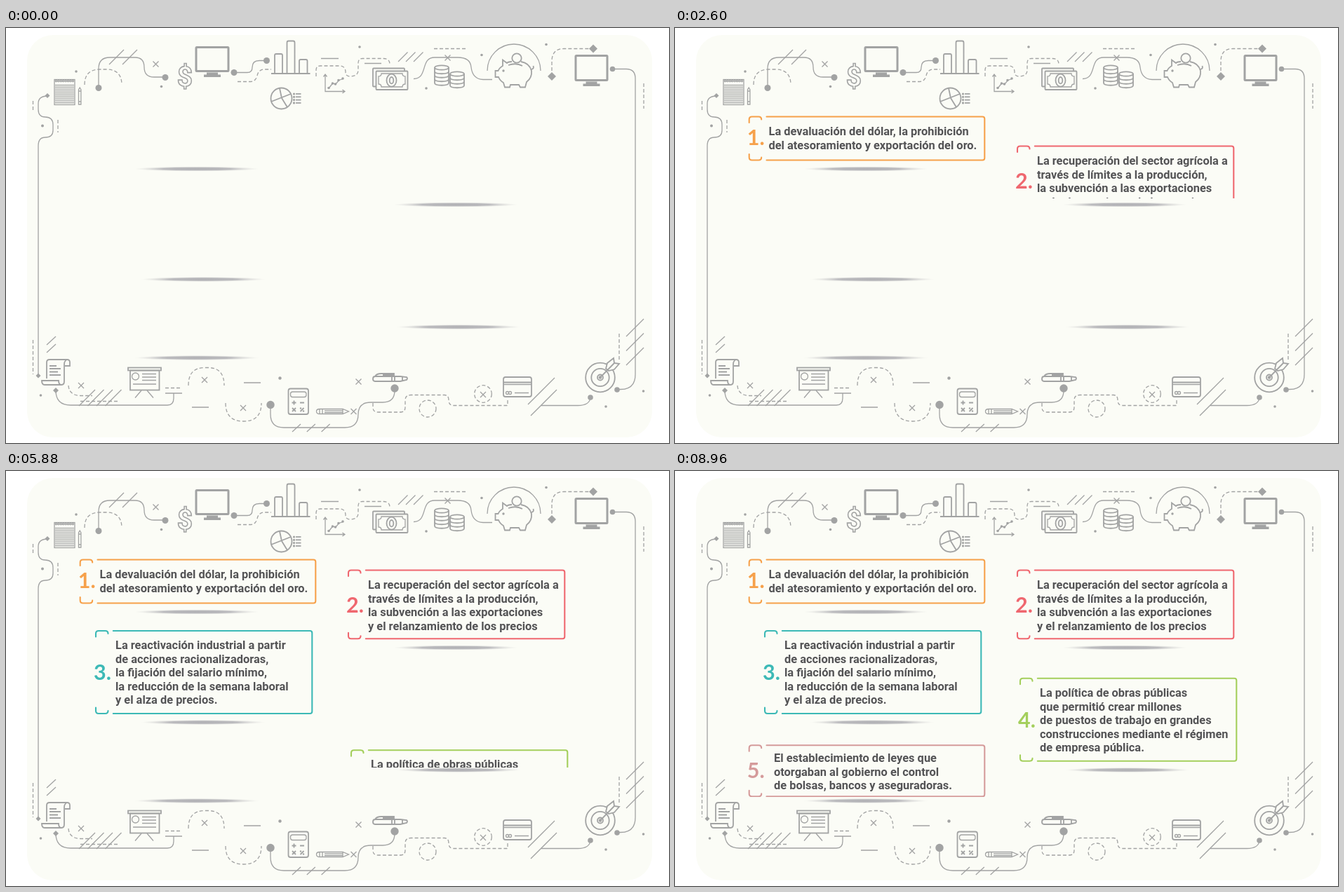
Recreate the animation shown at these times as an HTML page. Size 945 px wide and 592 px high, loop 9000 ms.

```html
<!DOCTYPE html>
<html lang="es">
<head>
<meta charset="utf-8">
<style>
html, body { margin: 0; width: 100%; height: 100%; overflow: hidden; background: #fff; }
svg { display: block; width: 945px; height: 592px; }
.art { fill: none; stroke: #a2a3a3; stroke-width: 1.3; }
.art .solid { fill: #a2a3a3; stroke: none; }
.art .dash { stroke-dasharray: 5 3; }
.art .bold { stroke-width: 1.8; }
.art .paper { fill: #fbfcf6; }
.copy { font: 600 16.4px Roboto, "Open Sans", sans-serif; fill: #535355; }
.num { font: 700 30.5px Lato, Roboto, sans-serif; }
.frame { fill: none; stroke-width: 2.1; stroke-linecap: round; }
</style>
</head>
<body>
<svg viewBox="0 0 945 592">
  <defs>
    <radialGradient id="shade">
      <stop offset="0" stop-color="#b0b0b4"/>
      <stop offset=".55" stop-color="#bbbbbe"/>
      <stop offset="1" stop-color="#dcdcda" stop-opacity="0"/>
    </radialGradient>
  </defs>
  <rect x="30" y="10" width="891" height="574" rx="37" fill="#fbfcf6"/>
  <g id="art" class="art"></g>
  <g id="shadows" fill="url(#shade)"></g>
  <g id="cards"></g>
</svg>
<script>
const STEP = 40, LOOP = 9000;
const $ = id => document.getElementById(id);

// Shape helpers
const path = (d, cls = '') => `<path class="${cls}" d="${d}"/>`;
const dash = d => path(d, 'dash');
const dot = (x, y, r = 1.8) => `<circle class="solid" cx="${x}" cy="${y}" r="${r}"/>`;
const ring = (x, y, r, cls = '') => `<circle class="${cls}" cx="${x}" cy="${y}" r="${r}"/>`;
const oval = (x, y, rx, ry, cls = '') => `<ellipse class="${cls}" cx="${x}" cy="${y}" rx="${rx}" ry="${ry}"/>`;
const box = (x, y, w, h, r = 0, cls = '') =>
  `<rect class="${cls}" x="${x}" y="${y}" width="${w}" height="${h}" rx="${r}"/>`;
const cross = (x, y, s = 4) => path(`M${x - s} ${y - s}l${2 * s} ${2 * s}m0 ${-2 * s}l${-2 * s} ${2 * s}`);
const diamond = (x, y, s) => path(`M${x} ${y - s}l${s} ${s}l${-s} ${s}l${-s} ${-s}z`, 'solid');
const slash = (x, y, w, h = w) => path(`M${x} ${y}l${w} ${-h}`);
const repeat = (n, draw) => Array.from({ length: n }, (_, i) => draw(i)).join('');

const monitor = (x, y, w, h) => `<g stroke-width="3">${box(x, y, w, h, 1)}</g>` +
  path(`M${x + w / 2 - 8} ${y + h + 2}h16v3h4v3.5h-24v-3.5h4z`, 'solid');

const coins = (x, top, n) => oval(x, top, 10, 3.2, 'bold') +
  repeat(n, i => path(`M${x - 10} ${top + i * 5.5}v5.5c0 4.3 20 4.3 20 0v-5.5`, 'bold'));

const connectors = () =>
  path('M132 85V58Q132 42 148 42H184Q197 42 197 56Q197 70 211 70H227') + dot(132, 85.5, 4.5) + dot(227, 70.5, 4.5) +
  path('M325 63.5H344Q351 63.5 351 56Q351 46.5 361 46.5H371') + dot(325, 63.5, 4.5) + dot(371.5, 46.5, 4.5) +
  path('M581 72.5C602 72 590 42 611 42H644Q662 42 663 56Q665 73 680 73.5H693') +
  path('M865 58.5H884Q897 58.5 897 72V494Q897 515.5 876 515.5H871') + dot(864.5, 58.5, 3.8) + dot(871, 516, 3.8) +
  path('M59 97Q46 97 46 108V116Q46 127 56 127Q67 127 67 138V146Q67 156 56 156Q46 156 46 168V496') +
  diamond(59, 96.5, 3.5) + diamond(46, 496, 3.5) +
  path('M71 517Q71 538 92 538H230Q239 538 239 528V521') + diamond(71, 517, 4) +
  path('M377 537V551Q377 570 396 570H483Q502 570 502 551Q502 534 520 534H537Q554 534 554 517') +
  dot(377, 537.5, 5.7) + dot(554, 514, 5.7) +
  path('M763 538.5H815Q832 538.5 833 527') + dot(833, 527, 3.8);

const dashes = () => [
  'M112 81Q112 59 134 59H143Q165 59 165 81', 'M330 76.5H349Q356 76 358 68Q360 59 368 59H378',
  'M442 69V60Q442 54 448 54H475Q484 54 484 63Q484 69 490 69Q502 69 502 60V50Q502 43.5 508 43.5H538Q547 43.5 547 52',
  'M610 29.5H657', 'M778 69V46Q779 29.5 795 29.5H837', 'M909 79V115', 'M38.5 104V117', 'M74 131V149',
  'M38.5 445V494', 'M89 510Q90 524 106 524.5H123', 'M106 532.5H160', 'M227 513.5H251',
  'M260 510Q260 484.5 283 484.5H288Q311 484.5 311 510', 'M313 535Q313 561 338.5 561T364 535',
  'M523 535V541Q523 548 530 548H562Q569 548 569 541V531Q569 523.5 577 523.5H625Q631 523.5 631 531Q631 538.5 638 538.5H715V529',
  'M874 436V476'
].map(dash).join('') + ring(601, 543, 12, 'dash') + ring(680, 522, 12.3, 'dash');

const accents = () =>
  slash(147, 52, 21) + slash(166, 52, 21) + repeat(3, i => slash(559 + i * 11, 48, 13.5)) +
  slash(58, 452, 13, 12) + slash(58, 463, 13, 12) +
  repeat(4, i => slash(104 + i * 12.5, 539, 23)) + repeat(3, i => slash(408 + i * 20.8, 576, 12, 11)) +
  slash(744, 537, 38) + slash(748, 553, 37) + repeat(3, i => slash(884, 440 + i * 20.5, 25)) +
  cross(213.5, 51.5) + cross(629.5, 42.5) + cross(107, 510) + cross(283, 502) + cross(338, 542) +
  cross(495.5, 547) + cross(502.5, 504.5) + cross(680, 523) +
  path('M449 43.5h25M511 50.5h24M227 521h24M265 541h24M339 506h24') +
  dot(100, 62) + dot(221.5, 83.5) + dot(504, 27) + dot(599, 86) + dot(678, 38.5) + dot(770, 23.5) +
  dot(52, 139.5, 2) + dot(49.5, 524) + dot(390.5, 499.5, 2.2) + dot(855, 540) + dot(908.5, 518) +
  diamond(837, 29.5, 6) + diamond(778, 69, 6);

const topIcons = () =>
  box(69, 73.5, 29, 36) + repeat(10, i => path(`M70 ${81.5 + i * 2.8}h27`)) +
  repeat(8, i => ring(71.5 + i * 3.4, 75.5, 1.2)) +
  path('M103.5 108V88l1.7-3 1.7 3v21h-3.4zM103.5 105h3.4M103.5 90h3.4') +
  `<text x="255" y="83" text-anchor="middle" font-family="Roboto, sans-serif" font-size="39" font-weight="700" stroke-width="1.6">$</text>` +
  monitor(271, 27.5, 46, 34) + monitor(812, 39.5, 45, 35) +
  path('M383 65V39q0-2 2-2h7q2 0 2 2V65M400.5 65V21q0-2.5 2-2.5h7q2 0 2 2.5V65M418 65V47q0-2 2-2h7.5q2 0 2 2V65M378 65h55.5', 'bold') +
  ring(392.5, 100.5, 15, 'bold') +
  path('M393 100L390 86M378 105L406 94M393 100L401 113', 'bold') +
  repeat(4, i => dot(410.5, 94 + i * 4.3, 1.6) + path(`M413 ${94 + i * 4.3}h7.5`, 'bold')) +
  path('M455 66v24.5h28M452.5 69.5l2.5-3.5 2.5 3.5M479.5 88l3.5 2.5-3.5 2.5M460 86l5.5-7 4.5 1 4.5-5.5 6-2') +
  dot(460, 85.5) + dot(465.5, 79) + dot(469.5, 80) + dot(474, 74.5) + dot(480, 72) +
  box(523, 57.5, 45, 26, 1, 'bold') + box(527.5, 61.5, 45, 26.5, 1, 'bold paper') +
  path('M535 65h30q0 4 4 4v11q-4 0-4 4h-30q0-4-4-4v-11q4 0 4-4z') +
  oval(549.5, 74.7, 7, 9, 'bold') + oval(549.5, 74.7, 2.8, 4.7, 'bold') +
  coins(621, 56.5, 4) + coins(643, 65.5, 3) +
  path('M686 61A38 38 0 0 1 762 61') + ring(728, 43, 6.7, 'bold') +
  path('M721 48Q716 48 714 50L708 45.5V54Q703 57 701.5 61H697.5V70H702Q704 75 709 78L711 84.5H718L719 81H731L733 84.5H740L742 77Q750 71 749 61Q746 50 734 48M749 59q4-1 2.5-5M716 53q11-4 20 1', 'bold') +
  dot(709, 61, 1.7);

const bottomIcons = () =>
  path('M58 500V477q0-4 4-4h25q4 0 4 4v5h-7M86 474q-3 1-3 6v24q0 5-4 5H55q-4 0-4-6h24q0 6 4 6M62 482h10M62 486h16M62 490.5h12M62 495h16', 'bold') +
  box(174, 484.5, 47, 4, 0, 'bold') + box(177, 488.5, 41.5, 28, 0, 'bold') + ring(184.5, 497, 5) +
  path('M194 493.5h20M194 498h20M194 502.5h20M181 508h33M193 517l-9 10.5M201 517l9 10.5') +
  box(402.5, 514.5, 28.5, 36.5, 3, 'bold') + box(405.5, 519, 22.5, 7.5, 3) +
  path('M407.5 534.5h6M410.5 531.5v6M419 534.5h6M408 542l5 5m0-5l-5 5M419.5 547l5-5', 'bold') +
  dot(420, 542.5, 1.2) + dot(424, 546.5, 1.2) +
  path('M447 543.5h33l8.5 3.5-8.5 3.5h-33q-4.5 0-4.5-3.5t4.5-3.5zM447 543.5v7M451 543.5v7M454 545.8h26M454 548.5h26M480 543.5v7') +
  path('M526 497h36l9 1q2 2 0 4l-9 2h-36q-3 0-3-3.5t3-3.5zM526 497q2-4 9-4h18v2h-16M550 497v7M554 497v7M565 497.5v6', 'bold') +
  box(709, 498, 40, 28, 3, 'bold') + path('M709 505.5h40', 'bold') + path('M709 508.5h40M725 520.5h20') +
  ring(714.5, 520.5, 2) + ring(718.5, 520.5, 2) +
  ring(847, 498.5, 20.8, 'bold') + ring(847, 498.5, 12.7, 'bold') + ring(847, 498.5, 4, 'bold') +
  path('M855 486l2-8 9-7 1 7 7 1-7 8-8 2z', 'paper bold') + path('M847 498.5L867 478', 'bold') + dot(847, 498.5, 2.3);

$('art').innerHTML = connectors() + dashes() + accents() + topIcons() + bottomIcons();

$('shadows').innerHTML = [[272, 201], [641, 252], [281, 358.5], [645, 426.5], [272, 470.5]]
  .map(([x, y]) => oval(x, y, 89, 3.5)).join('');

// Each card climbs at a steady pace from behind its floor line.
const cards = [
  { x: 105.7, right: 441.3, top: 126.5, bottom: 188.5, color: '#f6a14b', floor: 195, start: 320, end: 1000, rise: 68,
    tx: 133.5, ty: 153, ny: 166.5, lines: ['La devaluación del dólar, la prohibición', 'del atesoramiento y exportación del oro.'] },
  { x: 488, right: 796.3, top: 141.5, bottom: 239.3, color: '#ef676f', floor: 243, start: 1640, end: 2960, rise: 99,
    tx: 516, ty: 168, ny: 201.5, lines: ['La recuperación del sector agrícola a', 'través de límites a la producción,',
      'la subvención a las exportaciones', 'y el relanzamiento de los precios'] },
  { x: 128, right: 436.3, top: 228, bottom: 346, color: '#3cb9b6', floor: 353, start: 3560, end: 5000, rise: 124.5,
    tx: 156, ty: 254.3, ny: 298, lines: ['La reactivación industrial a partir', 'de acciones racionalizadoras,',
      'la fijación del salario mínimo,', 'la reducción de la semana laboral', 'y el alza de precios.'] },
  { x: 492, right: 800.3, top: 295.8, bottom: 413.7, color: '#a4cf5c', floor: 423, start: 5600, end: 7000, rise: 128,
    tx: 520, ty: 322, ny: 366, lines: ['La política de obras públicas', 'que permitió crear millones',
      'de puestos de trabajo en grandes', 'construcciones mediante el régimen', 'de empresa pública.'] },
  { x: 105.7, right: 441.3, top: 391.3, bottom: 464.3, color: '#d59b9b', floor: 465, start: 7800, end: 8960, rise: 72.8,
    tx: 141, ty: 415, ny: 438, lines: ['El establecimiento de leyes que', 'otorgaban al gobierno el control', 'de bolsas, bancos y aseguradoras.'] }
];

const outline = ({ x, right, top, bottom }) =>
  `M${x + 24.8} ${top}H${right - 3}q3 0 3 3V${bottom - 3}q0 3-3 3H${x + 24.8}` +
  `M${x} ${top + 8.5}v-4.5q0-4 4-4h9.500q4 0 4 4` +
  `M${x} ${bottom - 8.5}v4.5q0 4 4 4h9.500q4 0 4-4`;

$('cards').innerHTML = cards.map((c, i) => `
  <clipPath id="clip${i}"><rect x="${c.x - 10}" y="0" width="${c.right - c.x + 20}" height="${c.floor}"/></clipPath>
  <g clip-path="url(#clip${i})"><g id="card${i}">
    <path class="frame" stroke="${c.color}" d="${outline(c)}"/>
    <text class="num" x="${c.x - 3}" y="${c.ny}" fill="${c.color}">${i + 1}.</text>
    ${c.lines.map((line, n) => `<text class="copy" x="${c.tx}" y="${c.ty + n * 19.5}">${line}</text>`).join('')}
  </g></g>`).join('');

const nodes = cards.map((_, i) => $('card' + i));

function update(ms) {
  const t = Math.floor(ms % LOOP / STEP) * STEP;
  cards.forEach(({ start, end, rise }, i) => {
    const left = Math.max(0, (end - t) / (end - start));
    nodes[i].setAttribute('visibility', t < start ? 'hidden' : 'visible');
    nodes[i].setAttribute('transform', `translate(0 ${left * rise})`);
  });
}

let origin;
function tick(now) {
  origin ??= now;
  update(now - origin);
  requestAnimationFrame(tick);
}
update(0);
requestAnimationFrame(tick);
</script>
</body>
</html>
```
